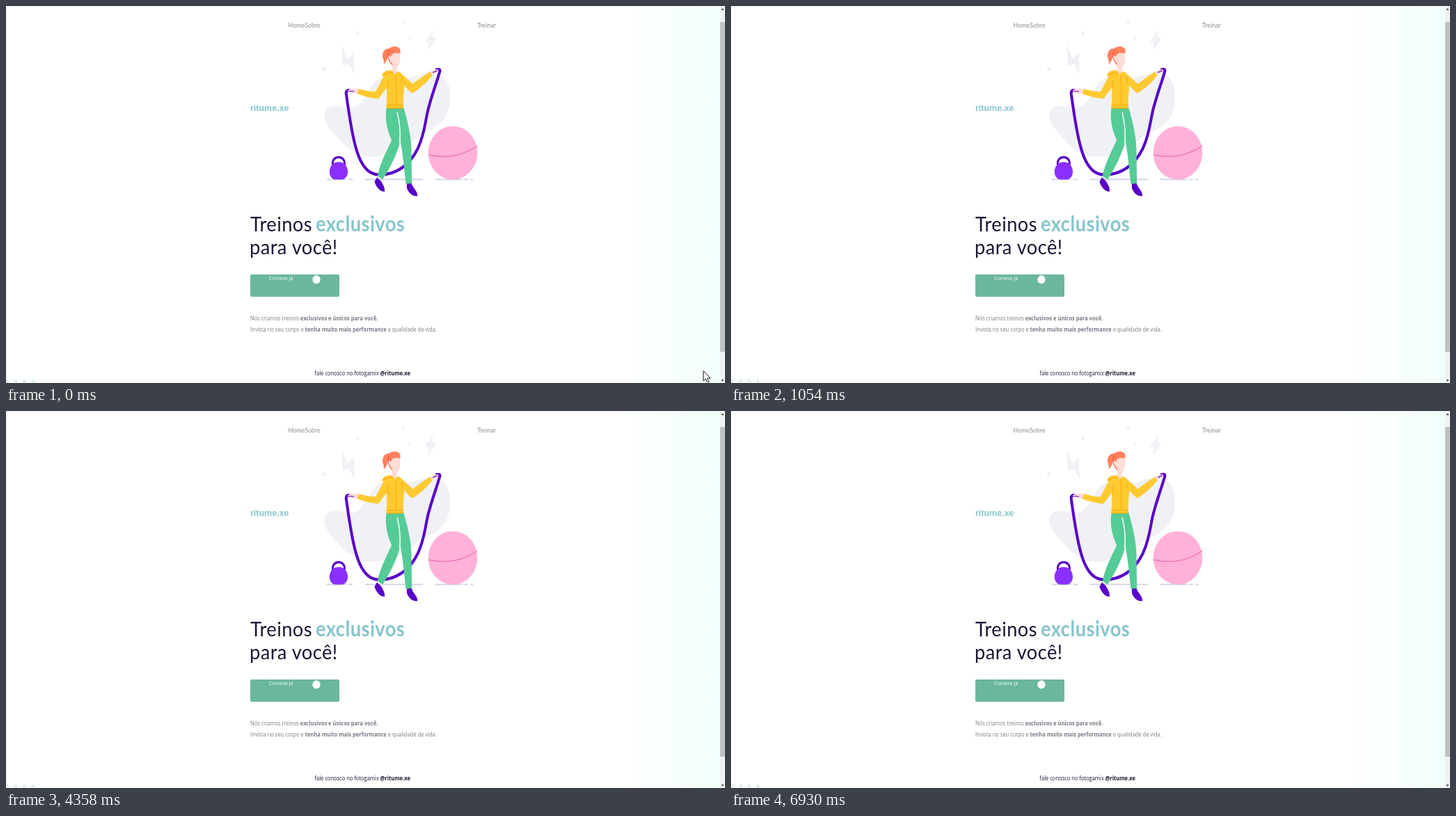
An HTML page that plays this animation: 1033 px wide and 542 px high, repeating every 7540 ms.

```html
<!DOCTYPE html>
<html lang="pt-BR">
<head>
<meta charset="utf-8">
<title>Treinos exclusivos</title>
<style>
  html, body { margin: 0; width: 100%; height: 100%; overflow: hidden; background: #fff; }
  svg { display: block; }
  text { font-family: "Open Sans", sans-serif; fill: #7d7a87; white-space: pre; }
  .mul { font-family: Lato, sans-serif; }
  .b { font-weight: 700; }
  .dark { fill: #1c1736; }
  .teal { fill: #86c5cd; }
  .white { fill: #fff; }
  .nav { fill: #8e8b96; }
  .green { fill: #429f7d; }
  .btn { fill: #6bb79d; }
  .wide text { font-size: 10.35px; }
  .tall text { font-size: 7.52px; }
  .wide .logo { font: 700 16px Inter, sans-serif; }
  .tall .logo { font: 700 12.5px "Liberation Sans", sans-serif; }
  .wide .nav { font-size: 12.2px; }
  .tall .nav { font-size: 8.95px; }
  .title { letter-spacing: .016em; }
  .wide .title { font-size: 37.4px; }
  .tall .title { font-size: 27.3px; }
  .wide .cta { font-size: 11.9px; }
  .tall .cta { font-size: 7.15px; }
</style>
</head>
<body>
<svg width="1033" height="542" viewBox="0 0 1033 542">
  <defs>
    <linearGradient id="down" gradientUnits="userSpaceOnUse" x1="0" y1="455" x2="0" y2="542">
      <stop stop-color="#fff"/><stop offset="1" stop-color="#f1fffb"/>
    </linearGradient>
    <linearGradient id="right" gradientUnits="userSpaceOnUse" x1="885" y1="0" x2="1026" y2="0">
      <stop stop-color="#fff"/><stop offset="1" stop-color="#f1fffb"/>
    </linearGradient>

    <g id="art">
      <g fill="#f0f1f5">
        <path d="M583 283C580 270 592 262 604 263C622 264 632 272 646 264C664 254 670 232 684 218C702 204 730 212 752 212C775 204 800 199 817 209C832 220 834 244 830 264C824 292 802 304 782 312C760 322 745 340 720 346C700 354 688 356 670 356C640 352 622 334 606 318C594 306 584 296 583 283Z"/>
        <path d="M617 150L628 177L641 166L643 205L631 187L619 190Z"/>
        <path d="M800 122L795 137L805 141L787 163L790 148L782 146Z"/>
        <circle cx="649" cy="131" r="3.4"/>
        <circle cx="739" cy="111" r="3.2"/>
        <circle cx="752" cy="140" r="2.2"/>
        <rect x="578.5" y="192.5" width="6.5" height="6.5" rx="2" transform="rotate(15 581.5 195.5)"/>
      </g>
      <path d="M587 397H626M630 397H639M663 397H778M802 397H855M858 397H867M872 397H877" stroke="#cdd3e6" stroke-width="2.2"/>

      <path d="M600 373C597 362 603 356.5 611 356.5S625 362 622 373" fill="none" stroke="#5800c8" stroke-width="4"/>
      <path d="M600 368Q611 362 622 368C629 374 631 384 627 391Q623 397 617 397H605Q599 397 595 391C591 384 593 374 600 368Z" fill="#8a2fff"/>

      <circle cx="837" cy="348.5" r="48.7" fill="#ffb1d9"/>
      <path d="M788.5 352Q841 363 885 336" fill="none" stroke="#ec82c0" stroke-width="2.2"/>

      <path d="M636 236C628 233 625 236 626 241C631 275 637 315 646 342C655 370 668 387 688 388C725 390 752 370 768 340C784 308 782 285 791 260C797 240 805 220 811 201Q813 195 805 197" fill="none" stroke="#5800c8" stroke-width="5.5" stroke-linecap="round"/>

      <g fill="#5800c8">
        <path d="M687 393L694 399C697 404 703 410 702 419C693 420 685 410 682 401Z"/>
        <path d="M746 403H755C757 412 768 418 767 427C757 429 748 420 746 412Z"/>
      </g>
      <g fill="#55cb96">
        <path d="M706 264C702 285 706 305 716 326C706 345 692 370 688 391L698 397C712 378 727 350 732 330L733 264Z"/>
        <path d="M724 264H739C747 290 754 315 755 340L756 404L744 405C741 380 738 350 733 325Z"/>
      </g>
      <path d="M727 275C731 290 734 310 732 330" fill="none" stroke="#fff" stroke-width="2" stroke-linecap="round"/>

      <g fill="#ffdcd5">
        <path d="M717 184H727L726 203Q721 210 716 202Z"/>
        <path d="M712 165L732 164C734 178 732 193 724 194C716 194 712 185 712 165Z"/>
        <path d="M652 232L640 232Q630 232 629 236Q636 242 652 240Z"/>
        <path d="M788 204Q798 195 809 197L806 202Q798 204 793 209Z"/>
      </g>
      <path d="M632 236L641 237M798 202L806 199" stroke="#5800c8" stroke-width="1.5" stroke-linecap="round"/>

      <g fill="#ff7f5c">
        <path d="M708 170C705 158 716 154 724 155C732 156 734 161 733 167C725 167 718 164 714 174Z"/>
        <path d="M711 159C703 158 698 164 698 172C698 178 702 180 700 187C706 184 708 175 710 168Z"/>
      </g>
      <path d="M711 162C706 171 710 182 717 188" fill="none" stroke="#f8572f" stroke-width="1.8"/>

      <g fill="#ffca30">
        <path d="M703 205L711 224L690 250C678 249 662 246 648 241L651 232C664 235 676 238 684 237C692 225 697 213 703 205Z"/>
        <path d="M728 200C740 207 750 217 758 223C768 216 781 207 792 201L796 208C786 220 771 233 757 240C750 236 742 227 738 222Z"/>
        <path d="M703 203C708 197 715 199 721 206L728 200C734 202 739 207 742 212C742 228 738 245 739 267H705C708 245 706 225 703 203Z"/>
        <path d="M697 209C697 201 708 196 717 199L723 207L710 206Z"/>
      </g>
      <path d="M698 208Q708 201 718 203M724 206Q726 235 725 262M707 262H739M706 267H739M709 216L708 232M737 211L736 222" fill="none" stroke="#f9ae0c" stroke-width="1.7"/>
    </g>
  </defs>

  <g id="wide" class="wide">
    <rect width="1033" height="542" fill="url(#down)"/>
    <text class="logo teal" x="148" y="60.5">ritume.xe</text>
    <text class="mul b nav" x="709" y="61.5">Home</text>
    <text class="mul b nav" x="778" y="61.5">Sobre</text>
    <text class="mul b nav" x="846" y="61.5">Treinar</text>
    <text class="mul title dark" x="147.5" y="195.5">Treinos</text>
    <text class="mul title b teal" x="276.5" y="195.5">exclusivos</text>
    <text class="mul title dark" x="146.5" y="237">para você!</text>
    <text x="148" y="287.5">Nós criamos treinos <tspan class="b">exclusivos e únicos para você.</tspan></text>
    <text x="148" y="308">invista no seu corpo e <tspan class="b">tenha muito mais performance</tspan> e</text>
    <text x="148" y="328.5">qualidade de vida.</text>
    <rect class="btn" x="147.5" y="365" width="133.5" height="39.3" rx="2.5"/>
    <circle class="white" cx="180" cy="384.5" r="7.5"/>
    <text class="cta white" x="196" y="389">COMECE JÁ</text>
    <text class="dark" x="422" y="500.5">fale conosco no fotogamix <tspan class="b green">@ritume.xe</tspan></text>
    <g id="dots" fill="#d4ece5"></g>
    <use href="#art"/>
  </g>

  <g id="tall" class="tall">
    <rect width="1033" height="542" fill="url(#right)"/>
    <g id="row" fill="#d4ece5"></g>
    <use href="#art" transform="matrix(.726 0 0 .79 34.3 -64.2)"/>
    <rect class="btn" x="351" y="386" width="128" height="32" rx="2"/>
    <!-- the narrow layout is shown slightly taller -->
    <g transform="scale(1 1.087)">
      <text class="logo teal" x="351" y="138.5">ritume.xe</text>
      <text class="mul nav" x="405.5" y="28.5">HomeSobre</text>
      <text class="mul nav" x="677" y="28.5">Treinar</text>
      <text class="mul title dark" x="351" y="298.5">Treinos</text>
      <text class="mul title b teal" x="445" y="298.5">exclusivos</text>
      <text class="mul title dark" x="350" y="328.5">para você!</text>
      <text class="cta white" x="378" y="362.7">Comece já</text>
      <circle class="white" cx="446" cy="361.8" r="5.6"/>
      <text x="351" y="416">Nós criamos treinos <tspan class="b">exclusivos e únicos para você.</tspan></text>
      <text x="351" y="430.8">Invista no seu corpo e <tspan class="b">tenha muito mais performance</tspan> e qualidade de vida.</text>
      <text class="dark" x="443.5" y="488.5">fale conosco no fotogamix <tspan class="b">@ritume.xe</tspan></text>
    </g>
    <rect x="1026" width="7" height="542" fill="#f1f1f1"/>
    <rect x="1026" y="23" width="7" height="474" fill="#c1c1c1"/>
    <path d="M1027.5 6L1029.5 3L1031.5 6ZM1027.5 537L1029.5 540L1031.5 537Z" fill="#505050"/>
    <path id="cursor" d="M0 0V14.5L3.3 11.5L5.8 17L8 16L5.6 10.7H10Z" fill="#fff" stroke="#111"/>
  </g>
  <path d="M0 .5H1033M.5 0V542M0 541.5H1026" stroke="#f3f4f4" fill="none"/>
</svg>
<script>
  const LOOP = 7540;
  const scenes = [[0, 'tall'], [1670, 'wide'], [3200, 'tall'], [5130, 'wide'], [6930, 'tall']];
  const cursorSteps = [[0, [1002, 524.5]], [70, [1005, 534]], [130, null]];
  const $ = id => document.getElementById(id);
  const at = (steps, t) => steps.filter(s => s[0] <= t).pop()[1];
  const show = (el, on) => { el.style.display = on ? '' : 'none'; };

  function dot(parent, cx, cy, r) {
    const c = document.createElementNS('http://www.w3.org/2000/svg', 'circle');
    Object.entries({ cx, cy, r }).forEach(([k, v]) => c.setAttribute(k, v));
    parent.append(c);
  }
  for (let i = 0; i < 4; i++) {
    dot($('row'), 2 + i * 12.2, 539, 2);
    for (let j = 0; j < 4; j++) dot($('dots'), 972 + i * 16.8, 487.5 + j * 14.8, 2.8);
  }

  function draw(now) {
    const t = now % LOOP;
    const scene = at(scenes, t);
    show($('wide'), scene === 'wide');
    show($('tall'), scene === 'tall');
    const pos = at(cursorSteps, t);
    show($('cursor'), pos);
    if (pos) $('cursor').setAttribute('transform', `translate(${pos})`);
  }

  const start = performance.now();
  function tick() {
    draw(performance.now() - start);
    requestAnimationFrame(tick);
  }
  tick();
</script>
</body>
</html>
```
